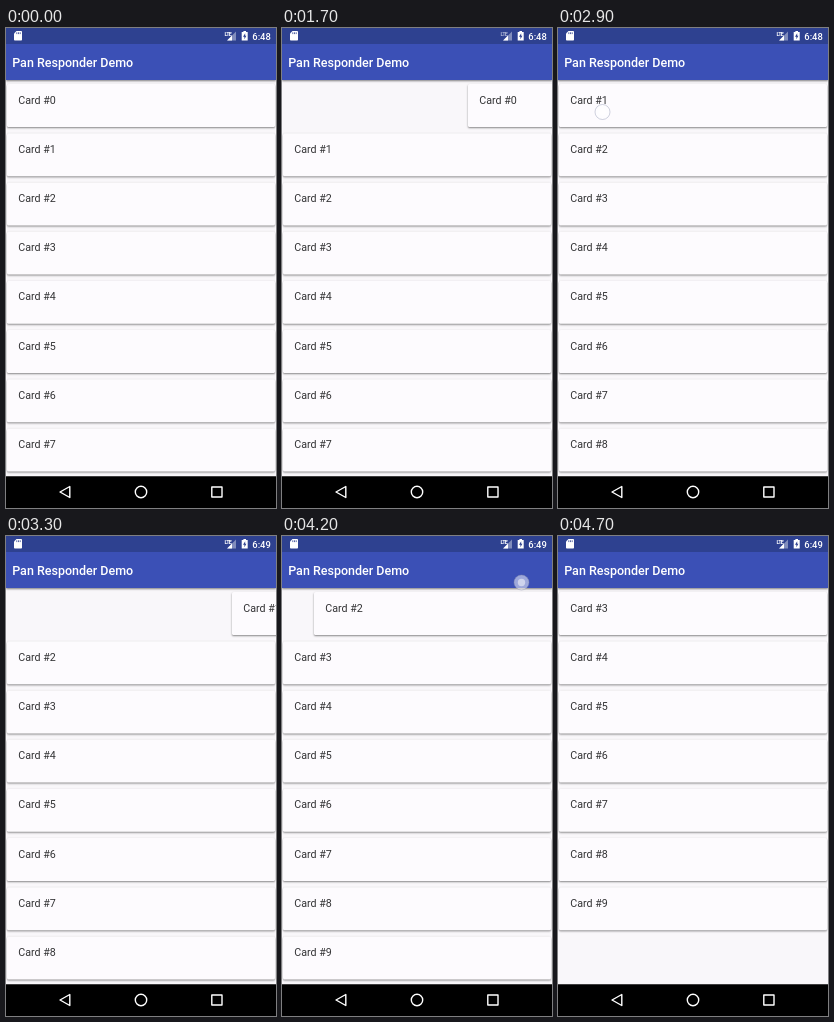
Recreate the animation shown at these times as an HTML page. Size 270 px wide and 480 px high, loop 4.8 s.

```html
<!DOCTYPE html>
<html lang="en">
<head>
<meta charset="utf-8">
<title>Pan Responder Demo</title>
<style>
  html, body { margin: 0; width: 100%; height: 100%; overflow: hidden; }
  #stage { position: relative; width: 270px; height: 480px; overflow: hidden; background: #f9f7fa; font-family: Roboto, sans-serif; }
  .card {
    position: absolute; left: 1px; top: 55.5px; width: 268px; height: 43px;
    border-radius: 1.5px; background: #fdfbfe; box-shadow: 0 1px 2px rgba(0, 0, 0, .46);
    font-size: 10.7px; line-height: 12px; color: #333335;
  }
  .card span { position: absolute; left: 11.3px; top: 10px; white-space: nowrap; transform: translateY(.6px); }
  #bar { position: absolute; top: 0; width: 270px; height: 52px; background: linear-gradient(#2e4190 16px, #3b50b6 16px); box-shadow: 0 1px 2px rgba(0, 0, 0, .5); }
  svg { position: absolute; left: 0; top: 0; }
</style>
</head>
<body>
<div id="stage">
  <div id="list"></div>
  <div id="bar"></div>
  <svg width="270" height="480" viewBox="0 0 270 480" fill="#fff">
    <path d="M10.5 3H15.2Q16 3 16 3.8V11.8Q16 12.6 15.2 12.6H8.8Q8 12.6 8 11.8V5.6Z"/>
    <path d="M10.8 4.3v1.8M12.5 4.3v1.8M14.2 4.3v1.8" stroke="#2e4190" stroke-width=".8"/>
    <path d="M230 3.5V12.4H221.1Z" opacity=".4"/>
    <path d="M226 7.5V12.4H221.1Z"/>
    <text id="network" x="218.5" y="8" font-size="5.4" font-weight="700" letter-spacing="-.7">LTE</text>
    <path d="M237.4 3h2.6v1h1.7v8.6h-6V4h1.7Z"/>
    <path d="M239.2 5.3L237 8.8H238.4V11.3L240.4 7.8H239.2Z" fill="#2e4190"/>
    <text id="clock" x="246.3" y="11.7" font-size="9.4" font-weight="500"></text>
    <text x="6.2" y="39.3" font-size="12.5" font-weight="500">Pan Responder Demo</text>
    <path d="M0 448.2H270V480H0Z" fill="#000"/>
    <g fill="none" stroke="#fff" stroke-width="1.4" stroke-linejoin="round">
      <path d="M54 464L63.8 458.5V469.5Z"/>
      <circle cx="135" cy="464" r="5.7"/>
      <path d="M205.8 459H216V469H205.8Z"/>
    </g>
    <g id="touch">
      <circle r="7.5" fill-opacity=".5" stroke="#8790ac" stroke-opacity=".5" stroke-width=".8"/>
      <circle r="3.7" fill-opacity=".5"/>
    </g>
  </svg>
</div>
<script>
const LOOP = 4800, STEP = 100, PITCH = 49.2, CARDS = 10;
const get = id => document.getElementById(id);

// Per swipe: start, time the list closes up, card offsets and finger positions per step.
const swipes = [
  { start: 1300, close: 2100, offsets: [0, 24, 95, 150, 185, 210], finger: [[47.5, 86], [128, 100], [236, 115]] },
  { start: 2900, close: 3500, offsets: [0, 28, 105, 170, 225], finger: [[44.5, 84], [140, 80], [238, 75]] },
  { start: 4100, close: 4700, offsets: [0, 31, 110, 175, 225], finger: [[45, 80], [239.5, 46.5], [252, 241]] }
];

const cards = Array.from({ length: CARDS }, (_, i) => {
  const card = document.createElement('div');
  card.className = 'card';
  card.innerHTML = `<span>Card #${i}</span>`;
  return get('list').appendChild(card);
});

function draw(now) {
  const step = Math.floor(now % LOOP / STEP), t = step * STEP;
  const first = swipes.filter(s => t >= s.close).length;
  const swipe = swipes[first];
  const k = swipe ? step - swipe.start / STEP : -1;
  const offset = k < 0 ? 0 : swipe.offsets[k] ?? 275;
  const finger = swipe?.finger[k];

  cards.forEach((card, i) => {
    card.style.display = i < first ? 'none' : '';
    card.style.transform = `translate(${i === first ? offset : 0}px, ${(i - first) * PITCH}px)`;
  });
  get('touch').style.display = finger ? '' : 'none';
  if (finger) get('touch').setAttribute('transform', `translate(${finger})`);
  get('network').setAttribute('opacity', t >= 1500 && t < 2100 ? .6 : 1);
  get('clock').textContent = t >= 3200 ? '6:49' : '6:48';
  requestAnimationFrame(draw);
}
draw(0);
</script>
</body>
</html>
```
